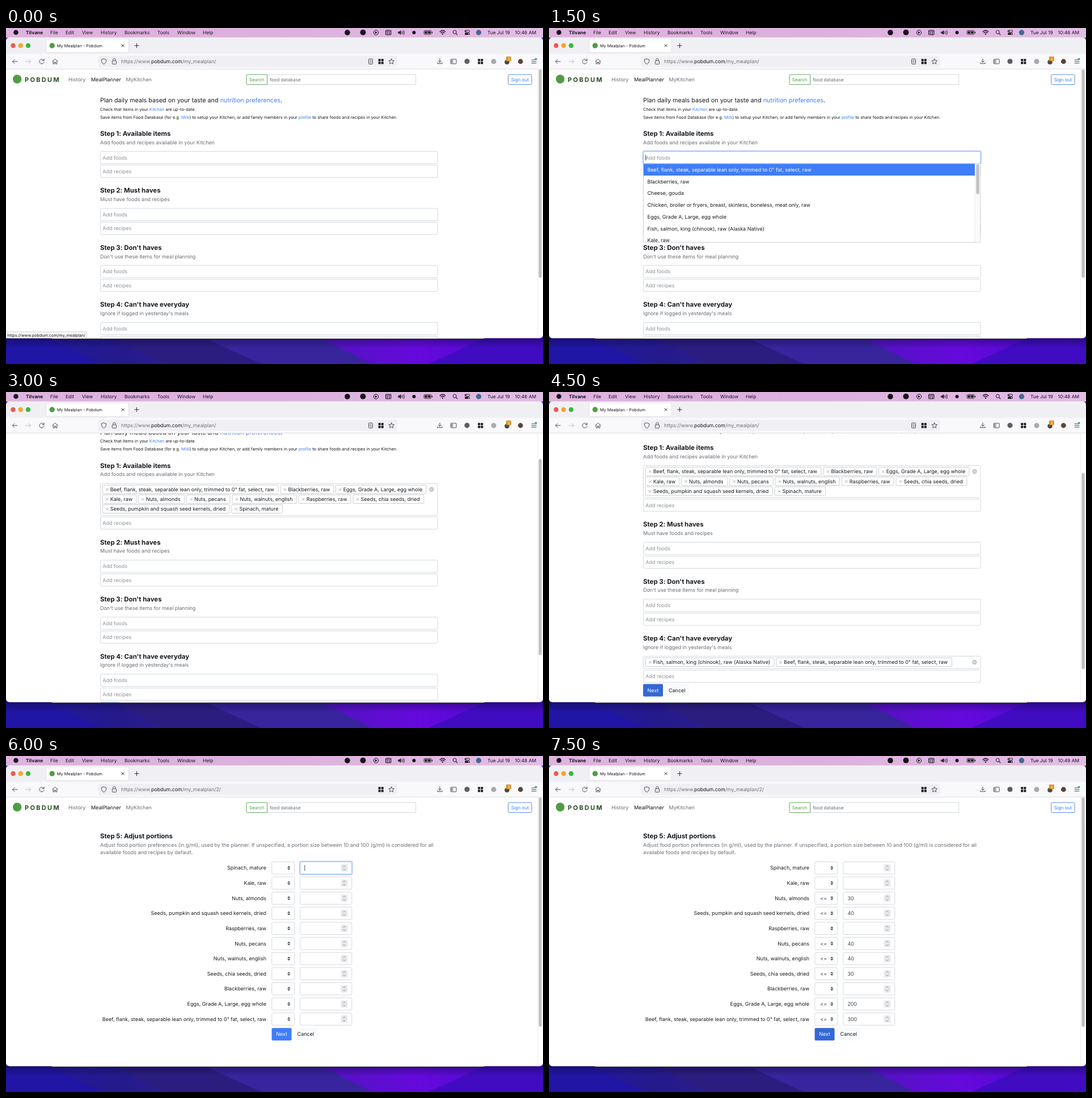
These frames come from a looping animation (947x592 px, 8 s). An HTML page:

```html
<!DOCTYPE html>
<html lang="en">
<head>
<meta charset="utf-8">
<title>Meal planner</title>
<style>
  html, body { margin: 0; width: 100%; height: 100%; overflow: hidden; background: #1c1478; }
  svg { display: block; width: 947px; height: 592px; }
  text { font-family: Inter, "Liberation Sans", sans-serif; text-rendering: geometricPrecision; white-space: pre; font-feature-settings: "calt" 0; }
</style>
</head>
<body>
<svg id="stage" viewBox="0 0 947 592" xmlns="http://www.w3.org/2000/svg"></svg>
<script>
const INK = '#181b1f', MUTED = '#676d74', HINT = '#8c9297', LINE = '#ced4da';
const BLUE = '#3f7dfa', PRESSED = '#3368d6', GREEN = '#4f9d45', ICON = '#4b4a52';
const BODY = 8.99;
const BEEF = 'Beef, flank, steak, separable lean only, trimmed to 0" fat, select, raw';
const SALMON = 'Fish, salmon, king (chinook), raw (Alaska Native)';

// Drawing helpers; text y is the middle of the capitals.
const text = (x, y, s, size = BODY, fill = INK, extra = '') =>
  `<text x="${x}" y="${y + size * 0.36}" font-size="${size}" fill="${fill}" ${extra}>${s}</text>`;
const rect = (x, y, w, h, fill, r = 0, extra = '') =>
  `<rect x="${x}" y="${y}" width="${w}" height="${h}" rx="${r}" fill="${fill}" ${extra}/>`;
const frame = (x, y, w, h, stroke = LINE, r = 2, fill = '#fff') =>
  rect(x, y, w, h, fill, r, `stroke="${stroke}" stroke-width=".9"`);
const dot = (x, y, r, fill) => `<circle cx="${x}" cy="${y}" r="${r}" fill="${fill}"/>`;
const ring = (x, y, r, stroke = ICON, w = 1) =>
  `<circle cx="${x}" cy="${y}" r="${r}" fill="none" stroke="${stroke}" stroke-width="${w}"/>`;
const path = (x, y, d, stroke = ICON, w = 1, fill = 'none') =>
  `<path transform="translate(${x} ${y})" d="${d}" stroke="${stroke}" stroke-width="${w}" fill="${fill}" stroke-linecap="round" stroke-linejoin="round"/>`;
const poly = (points, fill) => `<polygon points="${points}" fill="${fill}"/>`;
const tint = (s, color) => `<tspan fill="${color}">${s}</tspan>`;
const link = s => tint(s, BLUE);
const cross = (x, y, r, color, w) => path(x, y, `M${-r} ${-r}L${r} ${r}M${r} ${-r}L${-r} ${r}`, color, w);
const focusRing = (x, y, w, h) =>
  rect(x - 1, y - 1, w + 2, h + 2, 'none', 3, 'stroke="#c3d8fd" stroke-width="2"') + frame(x, y, w, h, '#86b2fb');
const caret = (x, y) => rect(x, y - 5, 0.8, 10, '#222');
const fourSquares = (x, y) =>
  [[-4.5, -4.5], [0.6, -4.5], [-4.5, 0.6], [0.6, 0.6]].map(([dx, dy]) => rect(x + dx, y + dy, 4, 4, '#18181c', 0.6)).join('');

function wallpaper() {
  return `<defs>
    <linearGradient id="sky"><stop offset="0" stop-color="#2317a6"/><stop offset=".2" stop-color="#241a8c"/>
      <stop offset=".45" stop-color="#34218f"/><stop offset=".62" stop-color="#5611c4"/>
      <stop offset=".77" stop-color="#6509dc"/><stop offset="1" stop-color="#420ac4"/></linearGradient>
    <linearGradient id="shade" x2="0" y2="1"><stop stop-color="#0c0838" stop-opacity=".45"/>
      <stop offset="1" stop-color="#0c0838" stop-opacity="0"/></linearGradient>
    <linearGradient id="bar"><stop stop-color="#deb3de"/><stop offset=".5" stop-color="#dcb0dd"/>
      <stop offset="1" stop-color="#e2bde4"/></linearGradient>
    <clipPath id="page"><rect x="0" y="72.5" width="947" height="474"/></clipPath>
    <clipPath id="menu"><rect x="166" y="239" width="596" height="138"/></clipPath>
  </defs>` +
  rect(0, 0, 947, 592, 'url(#sky)') +
  poly('0,546 70,546 170,592 0,592', '#2015a4') +
  poly('190,546 350,546 450,592 280,592', '#2b1d80') +
  poly('350,546 555,546 645,592 450,592', '#38249c') +
  poly('845,546 947,546 947,592 745,592', '#410bc2') +
  rect(0, 546, 947, 18, 'url(#shade)') +
  rect(79, 540, 766, 8.8, '#100b2c', 4) + rect(79, 540, 766, 7.6, '#cfccd8', 4);
}

function menuBar(time) {
  const items = [[78, 'File'], [105, 'Edit'], [134, 'View'], [167, 'History'], [209, 'Bookmarks'],
    [267, 'Tools'], [302, 'Window'], [347, 'Help']];
  const black = '#17121a';
  return rect(0, 0, 947, 17, 'url(#bar)') + dot(17.5, 7.8, 4.3, black) +
    text(35, 7.7, 'Tilvane', 8.4, black, 'font-weight="700"') +
    items.map(([x, s]) => text(x, 7.7, s, 8.4, black)).join('') +
    dot(602, 8, 4.8, black) + dot(629.5, 7.8, 5, black) +
    ring(652.5, 8, 4.2, black) + path(652.5, 8, 'M-1.2 -1.8L1.8 0L-1.2 1.8Z', black, 0.6, black) +
    rect(669.5, 4, 9.5, 8, 'none', 1, `stroke="${black}"`) +
    path(674.2, 8, 'M-4 -2H4M-3 .3H-1M1 .3H3M-3 2.3H-1M1 2.3H3', black) +
    path(695, 8, 'M-3 -1.3H-1.3L1 -3.4V3.4L-1.3 1.3H-3Z', black, 0.7, black) +
    path(697.5, 8, 'M.3 -1.7Q1.5 0 .3 1.7M2.2 -2.8Q4 0 2.2 2.8M4.1 -3.8Q6.5 0 4.1 3.8', black, 0.8) +
    dot(719.5, 8, 3, black) +
    rect(737, 4.4, 13, 7, 'none', 2, `stroke="${black}" stroke-width=".8"`) + rect(738.4, 5.8, 10.2, 4.2, black, 1) +
    rect(751, 6.5, 1.1, 3, black) + path(743.5, 7.9, 'M.6 -3L-1.5 .4H1.5L-.6 3', '#dcb0dc', 0.8) +
    path(770, 11, 'M-4.8 -4.5Q0 -9 4.8 -4.5M-3 -2.4Q0 -5.2 3 -2.4', black, 1.3) + dot(770, 10.6, 1.2, black) +
    ring(791.3, 7.2, 3, black) + path(793.5, 9.4, 'M0 0L2.4 2.4', black, 1.2) +
    rect(809, 4, 8.8, 3.3, 'none', 1.6, `stroke="${black}" stroke-width=".9"`) + rect(809, 8.6, 8.8, 3.5, black, 1.7) +
    dot(811, 5.6, 1.1, black) + dot(815.6, 10.3, 1, '#dfb8e1') + dot(833.5, 8, 4.7, '#426b92') +
    text(849, 7.7, 'Tue Jul 19', 8.4, black) + text(935, 7.7, `${time} AM`, 8.4, black, 'text-anchor="end"');
}

function browser(urlTail) {
  const reader = urlTail ? '' : rect(639.5, 54.5, 7, 9, 'none', 1, `stroke="${ICON}"`) +
    path(643, 59, 'M-1.7 -2H1.7M-1.7 0H1.7M-1.7 2H1.7', ICON, 0.7);
  return rect(0, 16.5, 947, 40, '#f0f0f4', 6) + rect(0, 45.5, 947, 27, '#f9f9fb') +
    rect(0, 71.8, 947, 0.9, '#dcdce0') +
    dot(12.5, 31, 4.2, '#f0584f') + dot(25.8, 31, 4.2, '#f3a52d') + dot(39, 31, 4.2, '#35b93f') +
    rect(70.2, 19, 146.6, 24.6, '#dadae0', 3) + rect(71, 19.4, 145, 23.4, '#fff', 2.6) +
    dot(81.3, 31, 4.7, GREEN) + text(90, 31.2, 'My Mealplan - Pobdum', 7.26, '#15141a') +
    cross(206, 31, 2.2, '#2c2b33', 0.9) + path(230.5, 31, 'M-3.7 0H3.7M0 -3.7V3.7', '#2c2b33') +
    path(15.8, 59, 'M4.3 0H-4.3M-.8 -3.5L-4.3 0L-.8 3.5') +
    path(39.5, 59, 'M-4.3 0H4.3M.8 -3.5L4.3 0L.8 3.5', '#bdbdc2') +
    path(63, 59, 'M3.6 -2A4.1 4.1 0 1 0 4.1 .8M4 -4.6V-1.6H1') +
    path(86.5, 59, 'M-4.5 -.2L0 -4.5L4.5 -.2M-3.3 -1V4.2H-1V1H1V4.2H3.3V-1') +
    rect(162.5, 49, 527.5, 19.5, '#f0f0f4', 3) +
    path(172.5, 59, 'M0 -4.6L4.3 -3Q4.2 3 0 4.7Q-4.2 3 -4.3 -3Z') +
    rect(187.3, 57.8, 7.2, 5.8, 'none', 1, `stroke="${ICON}"`) + path(190.9, 57.5, 'M-2.2 0V-1.5A2.2 2.2 0 0 1 2.2 -1.5V0') +
    text(203, 59, `https://www.${tint('pobdum.com', '#15141a')}/my_mealplan/${urlTail}`, 8.75, '#6f6e76') +
    reader + fourSquares(661.2, 59) +
    path(679.7, 59, 'M0 -4.8L1.45 -1.7L4.8 -1.4L2.3 .9L3 4.3L0 2.5L-3 4.3L-2.3 .9L-4.8 -1.4L-1.45 -1.7Z') +
    path(765, 58.5, 'M0 -4.2V2M-2.8 -.7L0 2L2.8 -.7M-4.2 2.4V4.2H4.2V2.4') +
    rect(784.3, 55, 9.8, 8, 'none', 1, `stroke="${ICON}"`) + rect(785, 55.5, 3.6, 7, '#a5a5ac') +
    dot(813, 58.8, 4.6, '#5d5d66') + fourSquares(836.7, 59) +
    dot(860, 59, 4.5, '#a9a9ad') + dot(883.5, 60, 4.3, '#4d4844') +
    rect(881.8, 50.3, 9, 8, '#dd9124', 1.3) + text(886.3, 54.3, '3', 6.5, '#fff', 'text-anchor="middle"') +
    dot(907.3, 59, 4.4, '#5b4537') +
    path(931, 59, 'M-4 -3H2M-4 0H4M-4 3H4', ICON) + dot(934.5, 54.8, 2, '#4f9f7d');
}

function navBar() {
  return dot(19.7, 90, 7.7, GREEN) +
    text(33, 90.6, 'POBDUM', 11, '#23501f', 'font-weight="700" letter-spacing="2.3"') +
    text(110, 91, 'History', BODY, MUTED) + text(150, 91, 'MealPlanner', BODY, '#111') + text(211.5, 91, 'MyKitchen', BODY, MUTED) +
    frame(460.5, 82, 262.2, 17.6, LINE, 0) + frame(424, 82, 36.6, 17.6, GREEN, 1.5) +
    text(442.2, 90.8, 'Search', 8.05, GREEN, 'text-anchor="middle"') + text(465, 90.8, 'food database', 8.05, '#6b7076') +
    frame(885.6, 82, 41.4, 17.6, BLUE, 2) + text(906.3, 90.8, 'Sign out', 8.05, BLUE, 'text-anchor="middle"');
}

const heading = (y, s) => text(166, y, s, 11.45, INK, 'font-weight="700"');

function buttons(x, y, pressed) {
  return rect(x, y - 11, 35, 22, pressed ? PRESSED : BLUE, 2) + text(x + 17.5, y, 'Next', BODY, '#fff', 'text-anchor="middle"') +
    rect(x + 38.5, y - 11, 42, 22, '#f9fafb', 2) + text(x + 45, y, 'Cancel');
}

function tag(x, right, y, label) {
  return frame(x, y - 7.6, right - x, 15.2, '#c3c7cb', 1.8) + cross(x + 8, y + 0.4, 1.9, '#999', 0.8) + text(x + 13.4, y, label);
}

const PANTRY = [
  [[170.3, 480, BEEF], [484, 577.8, 'Blackberries, raw'], [581.3, 741, 'Eggs, Grade A, Large, egg whole']],
  [[170.3, 229.8, 'Kale, raw'], [233.3, 315, 'Nuts, almonds'], [318.6, 395, 'Nuts, pecans'],
   [399, 512.4, 'Nuts, walnuts, english'], [516.3, 608, 'Raspberries, raw'], [612, 736.8, 'Seeds, chia seeds, dried']],
  [[170.3, 394, 'Seeds, pumpkin and squash seed kernels, dried'], [398, 487.6, 'Spinach, mature']]
];
const SKIPPED = [[[170.3, 397, SALMON], [400.7, 710.5, BEEF]]];
const STEPS = [
  ['Available items', 'Add foods and recipes available in your Kitchen'],
  ['Must haves', 'Must have foods and recipes'],
  ["Don't haves", "Don't use these items for meal planning"],
  ["Can't have everyday", "Ignore if logged in yesterday's meals"]
];

function plannerForm({ scroll = 0, chosen = {}, pressed = false }) {
  let out = navBar() +
    text(166, 127, `Plan daily meals based on your taste and ${link('nutrition preferences')}.`, 10.8) +
    text(166, 143, `Check that items in your ${link('Kitchen')} are up-to-date.`, 7.41) +
    text(166, 157, `Save items from Food Database (for e.g. ${link('Milk')}) to setup your Kitchen, or add family members in your ${link('profile')} to share foods and recipes in your Kitchen.`, 7.41);
  let y = 185.8;
  STEPS.forEach(([title, note], i) => {
    const rows = chosen[i] || [], grow = Math.max(0, rows.length - 1) * 17.3;
    out += heading(y, `Step ${i + 1}: ${title}`) + text(166, y + 15.6, note, BODY, MUTED) +
      frame(166.4, y + 31.6, 594.6, 21.6 + grow);
    if (rows.length) {
      rows.forEach((row, r) => row.forEach(([x, right, label]) => { out += tag(x, right, y + 42 + r * 17.3, label); }));
      out += dot(750.5, y + 42, 4.2, '#c4c4c4') + cross(750.5, y + 42, 1.5, '#fff', 0.9);
    } else out += text(170.2, y + 42.5, 'Add foods', BODY, HINT);
    y += grow;
    out += frame(166.4, y + 56, 594.6, 21.6) + text(170.2, y + 67, 'Add recipes', BODY, HINT);
    y += 100.45;
  });
  return `<g transform="translate(0 ${-scroll})">${out}${buttons(166, y - 9, pressed)}</g>`;
}

function dropdown() {
  const items = [BEEF, 'Blackberries, raw', 'Cheese, gouda',
    'Chicken, broiler or fryers, breast, skinless, boneless, meat only, raw',
    'Eggs, Grade A, Large, egg whole', SALMON, 'Kale, raw'];
  return focusRing(166.4, 217.4, 594.6, 21.6) + text(170.2, 228.3, 'Add foods', BODY, HINT) + caret(170, 228.3) +
    frame(166.4, 239, 594.2, 138.6, '#c4c8cc', 1) + rect(166.8, 239.3, 584.2, 20.7, BLUE) +
    rect(751, 239.4, 9.2, 137.8, '#fafafa') + rect(750.8, 260, 0.7, 117, '#e8e8e8') + rect(753.3, 240.3, 5.4, 52.4, '#c1c1c1', 2.7) +
    `<g clip-path="url(#menu)">${items.map((s, i) => text(173.5, 249.8 + i * 20.72, s, BODY, i ? INK : '#fff')).join('')}</g>`;
}

const PORTIONS = [['Spinach, mature'], ['Kale, raw'], ['Nuts, almonds', 30],
  ['Seeds, pumpkin and squash seed kernels, dried', 40], ['Raspberries, raw'], ['Nuts, pecans', 40],
  ['Nuts, walnuts, english', 40], ['Seeds, chia seeds, dried', 30], ['Blackberries, raw'],
  ['Eggs, Grade A, Large, egg whole', 200], [BEEF, 300]];

function portions(filled) {
  const rows = PORTIONS.map(([label, amount], i) => {
    const y = 197.2 + i * 26.63, focused = !filled && i === 0;
    return text(459, y, label, BODY, INK, 'text-anchor="end"') + frame(468.8, y - 10.8, 40, 21.6) +
      path(498.8, y, 'M-2 -1L0 -3.2L2 -1ZM-2 1L0 3.2L2 1Z', '#343a40', 0.4, '#343a40') +
      (focused ? focusRing(518.8, y - 10.8, 91, 21.6) + caret(526.5, y) : frame(518.8, y - 10.8, 91, 21.6)) +
      rect(590.6, y - 6.4, 11.8, 12.8, '#e9e9eb', 1.5) + path(596.5, y, 'M-2 -2L0 -4L2 -2M-2 2L0 4L2 2', '#73737a', 0.8) +
      (filled && amount ? text(478.3, y, '&lt;=', BODY, '#3d4349') + text(526.4, y, amount, BODY, '#3d4349') : '');
  });
  return navBar() + heading(140.7, 'Step 5: Adjust portions') +
    text(166, 156.4, 'Adjust food portion preferences (in g/ml), used by the planner. If unspecified, a portion size between 10 and 100 (g/ml) is considered for all', BODY, MUTED) +
    text(166, 170, 'available foods and recipes by default.', BODY, MUTED) + rows.join('') + buttons(468.6, 490.2, filled);
}

const statusTip = () => rect(-1, 535.3, 143.5, 12, '#f9f9fb', 1, 'stroke="#c8c8cc" stroke-width=".8"') +
  text(2.3, 541.2, 'https://www.pobdum.com/my_mealplan/', 7.2, '#15141a');

const SCENES = [
  { time: '10:46', thumb: [73, 440], page: () => plannerForm({}) + statusTip() },
  { time: '10:46', thumb: [73, 440], page: () => plannerForm({}) + dropdown() },
  { time: '10:48', thumb: [118, 463.5], page: () => plannerForm({ scroll: 56.3, chosen: { 0: PANTRY } }) },
  { time: '10:48', thumb: [142.5, 488.5], page: () => plannerForm({ scroll: 87.8, chosen: { 0: PANTRY, 3: SKIPPED }, pressed: true }) },
  { time: '10:48', thumb: [73, 477], urlTail: '2/', page: () => portions(false) },
  { time: '10:49', thumb: [73, 477], urlTail: '2/', page: () => portions(true) }
];

function render({ time, thumb: [top, bottom], urlTail = '', page }) {
  return wallpaper() + rect(0, 60, 947, 486.6, '#fff', 6) +
    `<g clip-path="url(#page)">${page()}${rect(937, 72, 0.8, 474.5, '#ebebeb')}${rect(939.3, top, 5.5, bottom - top, '#c1c1c1', 2.7)}</g>` +
    menuBar(time) + browser(urlTail);
}

const stage = document.getElementById('stage');
const LOOP = 8000, HOLD = 1500;
let shown = -1;
function tick() {
  const index = Math.floor(performance.now() % LOOP / HOLD);
  if (index !== shown) stage.innerHTML = render(SCENES[shown = index]);
  requestAnimationFrame(tick);
}
tick();
</script>
</body>
</html>
```
